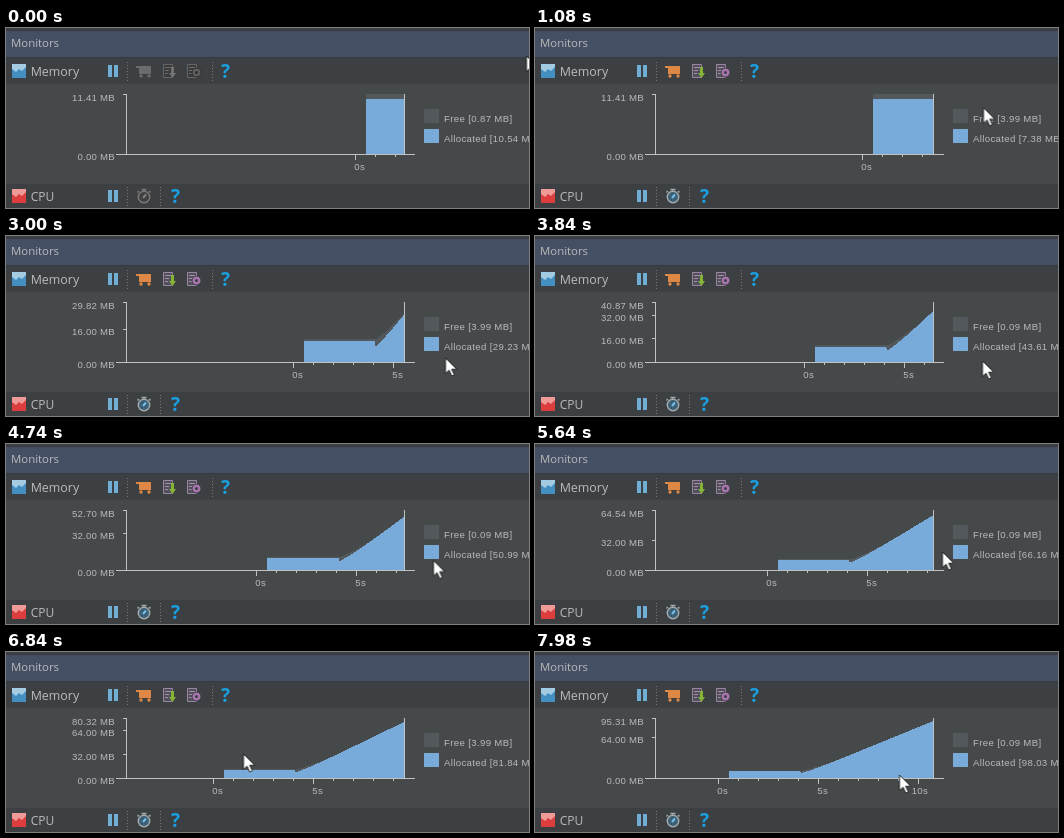
Recreate the animation shown at these times as an HTML page. Size 523 by 180 pixels, loop 8000 ms.

```html
<!DOCTYPE html>
<html lang="en">
<head>
<meta charset="utf-8">
<title>Memory monitor</title>
<style>
  html, body { margin: 0; width: 100%; height: 100%; overflow: hidden; background: #45494a; }
  svg { display: block; width: 523px; height: 180px; }
  text { font: 9.6px "Liberation Sans", Arial, sans-serif; letter-spacing: .25px; fill: #b9bbbc; font-kerning: none; }
  .title { font: 12.4px "Open Sans", "Noto Sans", sans-serif; letter-spacing: 0; }
  .help { font: bold 19px "Open Sans", "Noto Sans", sans-serif; fill: #1b9fe0; }
  .legend { letter-spacing: .36px; }
  .end { text-anchor: end; }
  .axis { stroke: #bfc1c2; fill: none; shape-rendering: crispEdges; }
  .split { stroke: #74787a; stroke-dasharray: 1 2; }
  .idle { filter: grayscale(1) brightness(.72); }
</style>
</head>
<body>
<svg viewBox="0 0 523 180">
  <defs>
    <path id="pause" d="M102 37h4v12h-4zM108 37h4v12h-4z" fill="#70aed4"/>
    <path id="wave" d="M0 5L4 8L7 5L10 7L14 3V14H0z"/>
    <path id="page" d="M157.500 36.500h9v13h-9z"/>
  </defs>
  <rect width="523" height="180" fill="#45494a"/>
  <rect width="523" height="3" fill="#3c4043"/>
  <rect y="3" width="523" height="26" fill="#444f63"/>
  <path d="M0 2.500H523M0 29.500H523" stroke="#363b41"/>
  <rect y="30" width="523" height="26" fill="#3c4042"/>
  <rect y="156" width="523" height="24" fill="#3c4042"/>
  <text class="title" x="5" y="19" style="font-size:11.400px">Monitors</text>
  <text class="title" x="24.700" y="48">Memory</text>
  <text class="title" x="24.700" y="173" style="font-size:12px">CPU</text>

  <g transform="translate(6 36)"><rect width="14" height="14" fill="#a3cbe2"/><use href="#wave" fill="#438fc0"/></g>
  <g transform="translate(6 161)"><rect width="14" height="14" fill="#ee9a97"/><use href="#wave" fill="#dc3d3d"/></g>
  <use href="#pause"/><use href="#pause" y="125"/>
  <path class="split" d="M121.500 34V53M206.500 34V53M121.500 159V178M154.500 159V178"/>
  <text class="help" x="215" y="50">?</text>
  <text class="help" x="165" y="175">?</text>

  <g id="tools">
    <g fill="#df8745">
      <path d="M133 38h12v8h-12zM130 38h3v2h-3z"/>
      <circle cx="135" cy="48" r="1.700"/><circle cx="143" cy="48" r="1.700"/>
    </g>
    <g fill="#51505a" stroke="#9b86a0"><use href="#page"/><use href="#page" x="24"/></g>
    <path d="M159 39.500h6M159 42.500h4M159 45.500h3M183 39.500h6M183 42.500h4M183 45.500h3" stroke="#a58fab"/>
    <path d="M165 39h3v6h2l-3.500 5l-3.500-5h2z" fill="#84b335"/>
    <circle cx="190.500" cy="44.500" r="4.500" fill="#a774ae" stroke="#3c4042"/>
    <circle cx="190.500" cy="44.500" r="1.500" fill="#3c4042"/>
    <g stroke="#a4a9ac" fill="none" stroke-width="1.500">
      <circle cx="138" cy="169" r="5.700" fill="#3c5f76"/>
      <path d="M135.500 161.500h5M138 162v2M143 163l1.500 1.500M133 163l-1.500 1.500"/>
      <path d="M137 170l3-3.500" stroke="#76bce6" stroke-width="2"/>
    </g>
  </g>

  <g shape-rendering="crispEdges">
    <path id="free" fill="#52585b"/>
    <path id="used" fill="#78aada"/>
  </g>
  <path class="axis" d="M120.500 66V126M110 126.500H409M398.500 66V126"/>
  <path class="axis" id="ticks"/>
  <g id="labels"></g>

  <rect x="418" y="81" width="15" height="14" fill="#52585b"/>
  <rect x="418" y="101" width="15" height="14" fill="#78aada"/>
  <text class="legend" id="freeText" x="438" y="94"></text>
  <text class="legend" id="usedText" x="438" y="114"></text>

  <path id="cursor" d="M0 0V15.500L3.600 12.200L6.200 18L8.800 16.800L6.200 11.200H11.200z" fill="#fff" stroke="#17191a" stroke-width=".9"/>
</svg>
<script>
const LOOP = 8, STEP = 0.06, RIGHT = 398, TOP = 66, BASE = 126, PX_PER_S = 20;
const FIRST = 0.55, DROP = 4.1, READ_EVERY = 0.55;
const $ = id => document.getElementById(id);

// Level until the collection, then a climb that settles at 13 MB/s
function usedAt(s) {
  const u = s - DROP;
  return u < 0 ? 10.54 : 7.38 + 13 * u - 3.4 * (1 - Math.exp(-u / .7));
}
const freeAt = s => s < DROP ? .87 : Math.max(.1, 3.6 - 2.1 * (s - DROP));
const peakAt = t => 11.41 + 13.15 * Math.max(0, t - 1.6);

// Legend values: an idle reading, the collection, then ever larger steps
function reading(k) {
  if (k < 2) return [10.54, .87];
  const n = k - 3;
  const used = n < 0 ? 7.38 : 15.37 + n * (6.8 + .065 * n);
  return [used, k < 6 || k % 6 === 0 ? 3.99 : .09];
}

const cursorMove = $('cursor').animate(
  [[0, 521, 28], [1.92, 393, 120], [3, 440, 122], [3.84, 448, 125],
   [5.64, 408, 108], [6.84, 238, 102], [7.98, 365, 123], [LOOP, 365, 123]]
    .map(([t, x, y]) => ({ offset: t / LOOP, transform: `translate(${x - .5}px, ${y}px)` })),
  { duration: LOOP * 1000, fill: 'both' });
cursorMove.pause();

const mb = v => v.toFixed(2) + ' MB';
const label = (x, y, s) => `<text class="end" x="${x}" y="${y}">${s}</text>`;

function draw(t) {
  const now = 2.45 + 1.04 * t, max = peakAt(t);
  const toX = s => RIGHT - (now - s) * PX_PER_S;
  const toY = v => Math.max(TOP, BASE - v / max * (BASE - TOP));

  const area = value => {
    let d = `M${toX(FIRST)} ${BASE}`;
    for (let s = FIRST; s < now; s += .05) d += `L${toX(s)} ${toY(value(s))}`;
    return d + `L${RIGHT} ${toY(value(now))}V${BASE}z`;
  };
  $('free').setAttribute('d', area(s => usedAt(s) + freeAt(s)));
  $('used').setAttribute('d', area(usedAt));

  let ticks = 'M117 66.5h3', labels = label(109, 132, mb(0)) + label(109, 72.5, mb(max));
  for (let s = 0; s <= now; s++) {
    const x = Math.round(toX(s)), major = s % 5 === 0;
    ticks += `M${x + .5} 127v${major ? 5 : 2}`;
    if (major) labels += label(x + 10, 142, s + 's');
  }
  // Markers double their spacing as the scale grows; the top one yields to the maximum
  const gap = 8 * 2 ** Math.max(0, Math.ceil(Math.log2(max / 8 / 2.8)));
  for (let v = gap; max - v >= gap * .47; v += gap) {
    const y = Math.floor(toY(v));
    ticks += `M117 ${y + .5}h3`;
    labels += label(109, y + 5.5, mb(v));
  }
  $('ticks').setAttribute('d', ticks);
  $('labels').innerHTML = labels;

  const [used, free] = reading(Math.floor(t / READ_EVERY + .1));
  $('freeText').textContent = `Free [${mb(free)}]`;
  $('usedText').textContent = `Allocated [${mb(used)}]`;
  $('tools').setAttribute('class', t < .42 ? 'idle' : '');
  cursorMove.currentTime = t * 1000;
}

const start = performance.now();
function frame() {
  const t = (performance.now() - start) / 1000 % LOOP;
  draw(Math.floor(t / STEP + 1e-6) * STEP);
  requestAnimationFrame(frame);
}
frame();
</script>
</body>
</html>
```
